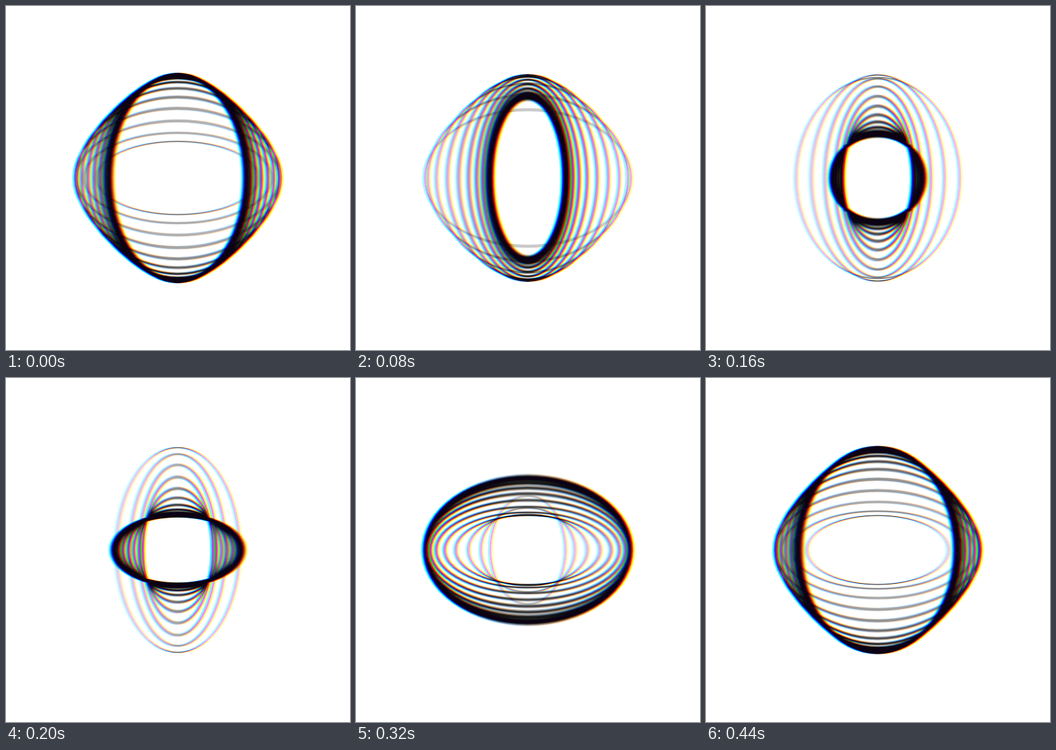
These frames come from a looping animation (500x500 px, 480 ms). An HTML page with a canvas:

```html
<!DOCTYPE html>
<html lang="en">
<head>
<meta charset="utf-8">
<title>Breathing rings</title>
<style>
  html, body { margin: 0; width: 100%; height: 100%; overflow: hidden; background: #fff; }
  canvas { display: block; width: 100vw; height: 100vh; }
</style>
</head>
<body>
<canvas id="stage" width="500" height="500"></canvas>
<script>
const SIZE = 500, MID = SIZE / 2;
const STEP_MS = 40;
const TICKS = [0, 2, 4, 6, 8, 10, 12, 14, 16, 18, 19, 20]; // of 21 per turn
const TURN = 2 * Math.PI, TICK = TURN / 21;
const RINGS = 13, SPREAD = 0.45 * TURN;
const SAMPLES = 15, SHUTTER = 0.3;
const SHIFT = 2.6, SMEAR = 2.6;
const INKS = [['#0ff', -SHIFT], ['#f0f', 0], ['#ff0', SHIFT]];
const DARKEST = '#0b0213';

function makeLayer() {
  const canvas = document.createElement('canvas');
  canvas.width = canvas.height = SIZE;
  return canvas.getContext('2d');
}

const layer = makeLayer();

// One instant: rings trail the leader along a circle in (rx, ry) space.
function drawInstant(c, phase, offset) {
  c.globalCompositeOperation = 'source-over';
  c.fillStyle = '#fff';
  c.fillRect(0, 0, SIZE, SIZE);
  c.globalCompositeOperation = 'multiply';
  for (let i = 0; i < RINGS; i++) {
    const lag = i / (RINGS - 1);
    const a = phase - SPREAD * lag * lag;
    const rx = 100 + 50 * Math.cos(a), ry = 100 + 50 * Math.sin(a);
    c.lineWidth = 1 + 5 * (1 - lag) ** 1.5;
    for (const [ink, dx] of INKS) {
      c.strokeStyle = ink;
      c.beginPath();
      c.ellipse(MID + dx + offset, MID, rx, ry, 0, 0, TURN);
      c.stroke();
    }
  }
}

// Average several instants for motion blur and a soft colour fringe.
function renderStep(tick) {
  const c = makeLayer();
  c.fillStyle = '#000';
  c.fillRect(0, 0, SIZE, SIZE);
  c.globalCompositeOperation = 'lighter';
  c.globalAlpha = 1 / SAMPLES;
  for (let s = 0; s < SAMPLES; s++) {
    const t = tick + SHUTTER * (s + 0.5) / SAMPLES;
    const jitter = (s * 4 % SAMPLES + 0.5) / SAMPLES - 0.5;
    drawInstant(layer, TURN / 4 + TICK * t, SMEAR * jitter);
    c.drawImage(layer.canvas, 0, 0);
  }
  c.globalAlpha = 1;
  c.globalCompositeOperation = 'lighten';
  c.fillStyle = DARKEST;
  c.fillRect(0, 0, SIZE, SIZE);
  return c.canvas;
}

const steps = TICKS.map(renderStep);
const stage = document.getElementById('stage').getContext('2d');
const start = performance.now();

function play() {
  const elapsed = Math.max(0, performance.now() - start);
  stage.drawImage(steps[Math.floor(elapsed / STEP_MS) % steps.length], 0, 0);
  requestAnimationFrame(play);
}
play();
</script>
</body>
</html>
```
